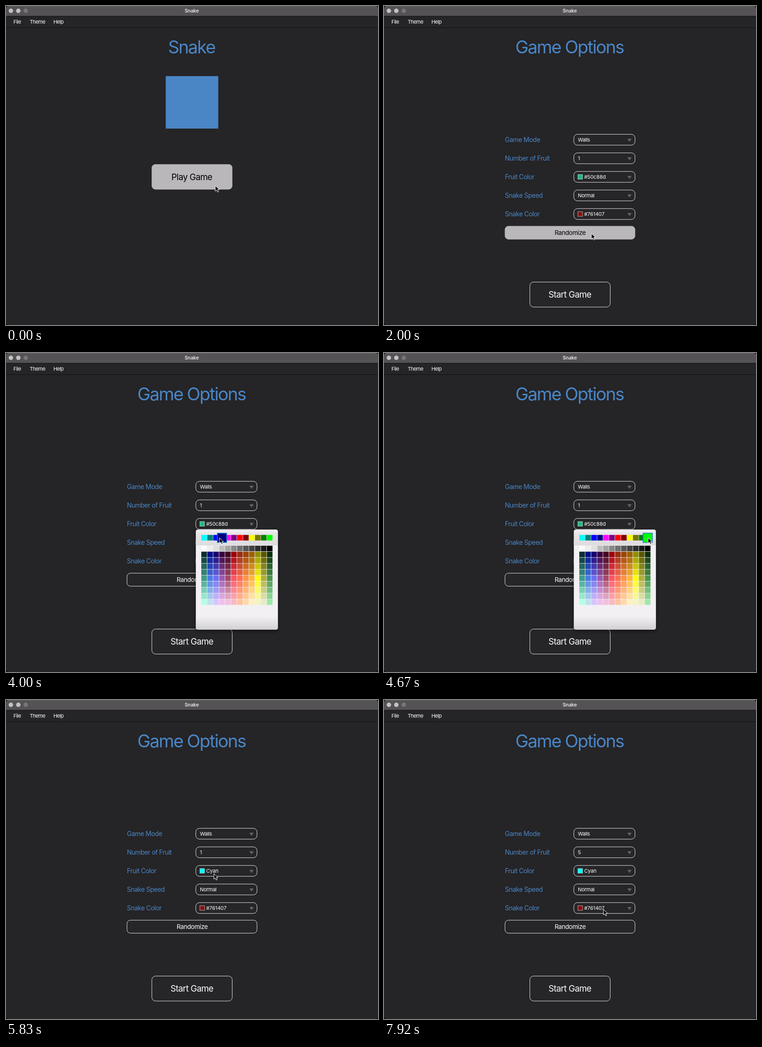
Animation, 800 px wide and 687 px high, one loop 8 s. Source, as an HTML page:

```html
<!DOCTYPE html>
<html lang="en">
<head>
<meta charset="utf-8">
<title>Snake</title>
<style>
  html, body { margin: 0; height: 100%; overflow: hidden; background: #000; }
  svg { display: block; width: 800px; height: 687px; }
  text { font: 11px Inter, Roboto, sans-serif; font-optical-sizing: none; letter-spacing: -.033em; fill: #fff; }
  .mid { text-anchor: middle; }
  .title { font-size: 38px; letter-spacing: -.048em; fill: #4a86c6; }
  .label { font-size: 14px; letter-spacing: -.037em; fill: #4a86c6; }
  .big { font-size: 18.5px; }
  .wide { font-size: 13.5px; }
  .menu { letter-spacing: -.05em; }
  .color { letter-spacing: -.01em; }
  .bar { font-size: 10.5px; font-weight: 600; letter-spacing: -.01em; fill: #e6e4e6; }
  .box { fill: #262527; stroke: #e4e2e4; }
  .hover .box { fill: #b9b7b9; stroke: #b9b7b9; }
  .hover text { fill: #000; }
</style>
</head>
<body>
<svg id="stage" viewBox="0 0 800 687"></svg>
<script>
const FPS = 12, LOOP = 8000;

// Moments (ms) at which the interface changes
const START = 330, RANDOMIZE = 1580, PICKER = [3500, 5500], LIST = [6330, 7330];

// Pointer stops: time, x, y
const PATH = [
  [0, 450, 387], [420, 450, 388], [1080, 444, 468], [1330, 446, 490],
  [2080, 446, 490], [2500, 458, 440], [3330, 483, 370], [3580, 483, 371],
  [4000, 459, 398], [4170, 459, 398], [4670, 568, 398], [5080, 434, 401],
  [5250, 431, 402], [5580, 431, 402], [6170, 472, 331], [6420, 472, 331],
  [6750, 473, 337], [7170, 473, 391], [7420, 473, 392], [7920, 472, 451],
  [8000, 472, 451]
];

const NAMED = ['#0ff', '#008080', '#00f', '#000080', '#f0f', '#800080',
  '#f00', '#800000', '#ff0', '#777700', '#008000', '#0f0'];
const GRAYS = [250, 238, 224, 190, 165, 136, 112, 86, 66, 46, 26, 0];
// Dark, middle and light shade of each palette column
const SHADES = [
  '0a2f33 3f9c8c b4ffe6', '00108c 4a7ce6 bfe0ee', '1a0070 7070f0 d8c4fc',
  '38003c 9a5cae f0c0ec', '46051f a8486a f2c0dc', 'a00008 ff5560 fcb8c0',
  '983010 ff7050 ffc49c', '9c4600 ff9445 ffd9ac', '9a6000 ffb840 fff0c0',
  '909000 ffff10 f4f4c4', '585800 b0b03c e6ecc4', '0c3010 4a944c 9ce8a8'
].map(column => column.split(' ').map(hex => hex.match(/../g).map(v => parseInt(v, 16))));

const CELL = 12.83, LEFT = 420;
const $ = id => document.getElementById(id);
const text = (x, y, cls, words, id = '') => `<text id="${id}" x="${x}" y="${y}" class="${cls}">${words}</text>`;
const rect = (x, y, w, h, attrs) => `<rect x="${x}" y="${y}" width="${w}" height="${h}" ${attrs}/>`;
const mix = (a, b, k) => a.map((v, i) => Math.round(v + (b[i] - v) * k));

function combo(label, i, swatch) {
  const y = 288 + 40 * i;
  return text(260, y + 5, 'label', label) +
    rect(408.2, y - 11.7, 131.6, 23.4, 'rx="8" class="box"') +
    (swatch ? rect(417, y - 5, 10, 10, `id="swatch${i}" stroke="#fff" stroke-opacity=".6"`) : '') +
    text(swatch ? 430.5 : 417, y + 4, swatch ? 'color' : '', '', 'value' + i) +
    `<path d="M524.5 ${y - 1.5}h7l-3.5 5z" fill="#555" stroke="#8a888a" stroke-width=".8"/>`;
}

function shade(column, row) {
  const [dark, middle, light] = SHADES[column];
  return row < 4 ? mix(dark, middle, row / 4) : mix(middle, light, (row - 4) / 4);
}

function palette() {
  let cells = '';
  const cell = (column, y, color) => cells +=
    rect(LEFT + column * CELL, y, 12, 12, `fill="${color}"`);
  for (let c = 0; c < 12; c++) {
    cell(c, 391.8, NAMED[c]);
    cell(c, 415, `rgb(${[GRAYS[c], GRAYS[c], GRAYS[c]]})`);
    for (let r = 0; r < 9; r++) cell(c, 415 + (r + 1) * CELL, `rgb(${shade(c, r)})`);
  }
  return cells;
}

$('stage').innerHTML = `
  <defs>
    <linearGradient id="panel" x2="0" y2="1">
      <stop stop-color="#f4f2f4"/><stop offset=".04" stop-color="#e6e4e6"/>
      <stop offset=".155" stop-color="#dedcde"/><stop offset=".16" stop-color="#f2f0f2"/>
      <stop offset=".87" stop-color="#f2f0f2"/><stop offset="1" stop-color="#d2d0d2"/>
    </linearGradient>
    <filter id="shadow"><feDropShadow dx="0" dy="3" stdDeviation="4" flood-opacity=".5"/></filter>
    <clipPath id="frame">${rect(0, 0, 800, 687, 'rx="5"')}</clipPath>
  </defs>
  <g clip-path="url(#frame)">
    ${rect(0, 0, 800, 687, 'fill="#252426"')}
    ${rect(0, 0, 800, 22, 'fill="#545254"')}
    ${rect(0, 0, 800, 1, 'fill="#6a686a"')}
    ${rect(0, 21.5, 800, 1, 'fill="#0c0b0c"')}
    ${rect(0, 46, 800, 1, 'fill="#100f10"')}
  </g>
  <circle cx="10.5" cy="10.3" r="4.8" fill="#c2c0c2"/>
  <circle cx="26.5" cy="10.3" r="4.8" fill="#c2c0c2"/>
  <circle cx="42.5" cy="10.3" r="4.8" fill="#777577"/>
  ${text(399.5, 13.8, 'bar mid', 'Snake')}
  ${text(16, 38.3, 'menu', 'File')}${text(51, 38.3, 'menu', 'Theme')}${text(102, 38.3, 'menu', 'Help')}
  <g id="menu">
    ${text(399, 101.7, 'title mid', 'Snake')}
    ${rect(343.5, 151, 113, 113, 'fill="#4a86c6"')}
    <g class="hover">
      ${rect(313.3, 340.7, 173.5, 54.5, 'rx="8" class="box" stroke-width="0"')}
      ${text(399.7, 375, 'big mid', 'Play Game')}
    </g>
  </g>
  <g id="options">
    ${text(399, 101.7, 'title mid', 'Game Options')}
    ${combo('Game Mode', 0)}${combo('Number of Fruit', 1)}${combo('Fruit Color', 2, true)}
    ${combo('Snake Speed', 3)}${combo('Snake Color', 4, true)}
    <g id="randomize">
      ${rect(260.2, 474.2, 279.6, 28, 'rx="7.5" class="box"')}
      ${text(400.3, 493, 'wide mid', 'Randomize')}
    </g>
    ${rect(313.7, 594.5, 172.8, 53.8, 'rx="8" class="box"')}
    ${text(399.7, 628, 'big mid', 'Start Game')}
    <g id="list">
      ${rect(408, 340, 132, 64, 'fill="#2a292b" filter="url(#shadow)"')}
      ${text(413, 355.3, '', '1')}${text(413, 376, '', '3')}${text(413, 397, '', '5')}
    </g>
    <g id="picker">
      ${rect(408.5, 380.5, 176, 215, 'rx="4" fill="url(#panel)" stroke="#c4c2c4" filter="url(#shadow)"')}
      ${palette()}
      ${rect(0, 388, 20, 20, 'id="tile" stroke="#1583cf" stroke-width="1.5"')}
    </g>
  </g>
  <path id="pointer" d="M0 0V12L2.9 9.3L4.9 13.8L7 12.9L5 8.5H8.8Z" fill="#000" stroke="#fff" stroke-linejoin="round"/>`;

function pointerAt(t) {
  const next = Math.max(1, PATH.findIndex(stop => stop[0] >= t));
  const [t0, x0, y0] = PATH[next - 1], [t1, x1, y1] = PATH[next];
  const k = (t - t0) / (t1 - t0), ease = k * k * (3 - 2 * k);
  return [x0 + (x1 - x0) * ease, y0 + (y1 - y0) * ease];
}

const show = (id, visible) => $(id).style.display = visible ? '' : 'none';
const during = (t, [from, to]) => t >= from && t < to;

function setCombo(i, value, color) {
  $('value' + i).textContent = value;
  if (color) $('swatch' + i).setAttribute('fill', color);
}

function render(t) {
  const [x, y] = pointerAt(t);
  const mixed = t >= RANDOMIZE, picked = t >= PICKER[1];
  show('menu', t < START);
  show('options', t >= START);
  show('list', during(t, LIST));
  show('picker', during(t, PICKER));

  setCombo(0, mixed ? 'Walls' : 'Normal');
  setCombo(1, t >= LIST[1] ? '5' : '1');
  if (picked) setCombo(2, 'Cyan', '#0ff');
  else if (mixed) setCombo(2, '#50c88d', '#1cbc84');
  else setCombo(2, 'Green', '#008000');
  setCombo(3, 'Normal');
  if (mixed) setCombo(4, '#761407', '#84100f');
  else setCombo(4, '#6893c6', '#4a86c6');

  $('randomize').classList.toggle('hover', y >= 474 && y <= 502 && x >= 260 && x <= 540);

  const column = Math.floor((x - LEFT) / CELL);
  const overTile = y >= 391 && y <= 405 && column >= 0 && column < 12;
  show('tile', overTile);
  if (overTile) {
    $('tile').setAttribute('x', LEFT + column * CELL - 4);
    $('tile').setAttribute('fill', NAMED[column]);
  }
  $('pointer').setAttribute('transform', `translate(${x} ${y})`);
}

function tick() {
  const time = performance.now() % LOOP;
  // Small lead keeps each step on its rounded-down start time
  render(Math.floor((time + 4) * FPS / 1000) * 1000 / FPS % LOOP);
  requestAnimationFrame(tick);
}
tick();
</script>
</body>
</html>
```
